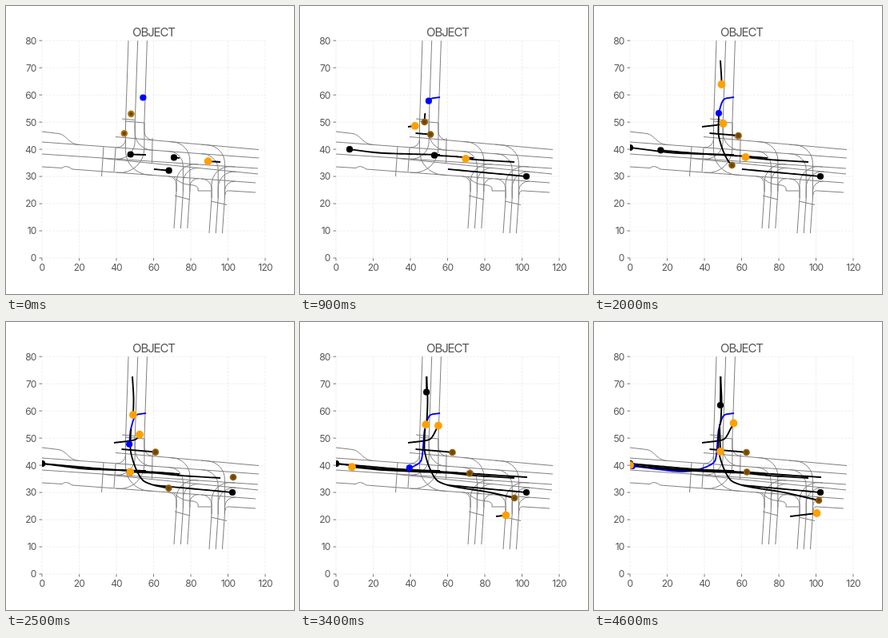
Animation of 360x360 px, one loop 4.7 s. Source, as an HTML page with a canvas:

```html
<!DOCTYPE html>
<html lang="en">
<head>
<meta charset="utf-8">
<title>Object tracks</title>
<style>
html, body { margin: 0; width: 100%; height: 100%; overflow: hidden; background: #fff; }
canvas { display: block; width: 360px; height: 360px; }
</style>
</head>
<body>
<canvas id="stage"></canvas>
<script>
const STEP = 100, STEPS = 47;
const LEFT = 45, RIGHT = 324, TOP = 43.2, BOTTOM = 315;
const FONT = 'Inter, "DejaVu Sans", sans-serif';
const canvas = document.getElementById('stage');
const ctx = canvas.getContext('2d');
const ratio = window.devicePixelRatio || 1;
canvas.width = canvas.height = 360 * ratio;
ctx.scale(ratio, ratio);

// Lane borders across the map, top to bottom: start x, start y, end x, end y
const lanes = [
  [137, 163.5, 316, 179.5],
  [45, 170, 316, 190],
  [45, 185, 315, 203],
  [122, 190.5, 315, 210],
  [83, 204, 312, 221]
];
const laneY = (k, x) => {
  const [x1, y1, x2, y2] = lanes[k];
  return y1 + (x - x1) * (y2 - y1) / (x2 - x1);
};

function buildRoads() {
  // Kerbs that bulge, then crossings and stop lines
  const path = new Path2D(`M45 157L66 159.5C76 161 78 173 92 173.5
    M45 201L70 202.5Q75 198 83 204
    M209 213Q218 223 230 223.5T240 231L256 231M274 236Q274 230 280 231L312 233
    M122 176L119.5 213M137 177L135 207M183 165L182.5 196
    M145 141L161 142.5M149 144L173 146M211 237L230 242M256 244L276 248.5`);
  const line = (x1, y1, x2, y2) => { path.moveTo(x1, y1); path.lineTo(x2, y2); };
  lanes.forEach(lane => line(...lane));

  // Rounded corner from an arm's mouth onto a lane
  const turn = (x, y, k, end, radius) => {
    const corner = laneY(k, x);
    const r = Math.min(radius, Math.abs(end - x), Math.abs(corner - y));
    path.moveTo(x, y);
    path.arcTo(x, corner, end, laneY(k, end), r * 0.95);
    path.lineTo(end, laneY(k, end));
  };

  // Three borders per arm; each turns onto a lane on both sides
  const arm = (outerX, outerY, mouthX, mouthY, gap, reach, radius, leftLanes, rightLanes) => {
    for (let i = 0; i < 3; i++) {
      const x = mouthX + i * gap, center = mouthX + gap;
      line(outerX + i * gap, outerY, x, mouthY);
      turn(x, mouthY, leftLanes[i], center - reach, radius);
      turn(x, mouthY, rightLanes[i], center + reach, radius);
    }
  };
  arm(153, 43, 149.5, 146, 11.7, 23, 32, [1, 2, 4], [4, 1, 0]);
  arm(210, 278, 213, 232, 8.4, 19, 24, [4, 1, 0], [2, 3, 4]);
  arm(254, 284, 257, 240, 8.2, 21, 24, [4, 1, 0], [2, 3, 4]);
  return path;
}
const roads = buildRoads();

// Key points of each agent: step, x, y
const agents = {
  blue: [
    [[-2, 175, 114], [5, 163.5, 116], [20, 156, 134], [30, 151.5, 173], [38, 111.5, 187], [46, 48, 180]]
  ],
  black: [
    [[-2, 175, 186], [5, 106.5, 184], [10.5, 45, 177]],
    [[-2, 185, 204], [8.5, 283, 213]],
    [[-2, 217, 190], [5, 191, 188], [13, 140, 185], [24.5, 45, 177]],
    [[28, 158.5, 68], [38, 158, 97], [46, 158, 104]]
  ],
  brown: [
    [[-2, 144.5, 159], [20, 180.5, 162], [28, 190.5, 163]],
    [[-2, 156.5, 134], [5, 156, 137.5], [13, 155.5, 158], [20, 172.5, 199], [30, 242, 214], [36, 281, 223]],
    [[25, 284, 194], [30, 236, 191], [38, 191, 187.5]]
  ],
  orange: [
    [[-2, 268, 195], [5, 219, 192], [13, 199, 190], [20, 189.5, 189], [30, 104, 185], [36, 45, 179]],
    [[4, 135, 151], [20, 161.5, 147], [30, 171, 133], [38, 174.5, 126.5]],
    [[10, 158, 68], [20, 159.5, 98], [30, 158, 127.5], [38, 157, 129], [46, 158, 162]],
    [[27, 245, 243], [46, 278.5, 239]]
  ]
};
const tracks = Object.entries(agents).flatMap(([kind, list]) => list.map(keys => ({ kind, keys })));

const slope = (keys, i, axis) => (keys[i + 1][axis] - keys[i][axis]) / (keys[i + 1][0] - keys[i][0]);

// Tangent that never overshoots its neighbours
function tangent(keys, i, axis) {
  const last = keys.length - 1;
  if (i === 0 || i === last) return slope(keys, Math.min(i, last - 1), axis);
  const a = slope(keys, i - 1, axis), b = slope(keys, i, axis);
  return a * b <= 0 ? 0 : 2 * a * b / (a + b);
}

function place(keys, step) {
  const last = keys[keys.length - 1];
  if (step >= last[0]) return [last[1], last[2]];
  let i = 0;
  while (keys[i + 1][0] <= step) i++;
  const p = keys[i], q = keys[i + 1], span = q[0] - p[0], u = (step - p[0]) / span;
  return [1, 2].map(axis => {
    const d = q[axis] - p[axis];
    const m = tangent(keys, i, axis) * span, n = tangent(keys, i + 1, axis) * span;
    return p[axis] + u * (m + u * (3 * d - 2 * m - n + u * (m + n - 2 * d)));
  });
}

function line(x1, y1, x2, y2) {
  ctx.beginPath();
  ctx.moveTo(x1, y1);
  ctx.lineTo(x2, y2);
  ctx.stroke();
}

function disc(x, y, r, color) {
  ctx.fillStyle = color;
  ctx.beginPath();
  ctx.arc(x, y, r, 0, Math.PI * 2);
  ctx.fill();
}

function label(text, x, y, size, spacing, align = 'center') {
  ctx.font = `${size}px ${FONT}`;
  ctx.letterSpacing = `${spacing}px`;
  ctx.textAlign = align;
  ctx.fillStyle = '#555';
  ctx.fillText(text, x, y);
}

function gridLine(...ends) {
  ctx.strokeStyle = '#ebebeb';
  ctx.setLineDash([3, 1.4]);
  line(...ends);
  ctx.setLineDash([]);
  ctx.strokeStyle = '#555';
}

function drawAxes() {
  ctx.lineWidth = 0.8;
  for (let v = 0; v <= 120; v += 20) {
    const x = LEFT + v * 2.325;
    gridLine(x, BOTTOM, x, TOP);
    line(x, BOTTOM, x, BOTTOM + 3.5);
    label(v, x, 331.3, 12, -0.8);
  }
  for (let v = 0; v <= 80; v += 10) {
    const y = BOTTOM - v * 3.3975;
    gridLine(LEFT, y, RIGHT, y);
    line(LEFT - 3.5, y, LEFT, y);
    label(v, 37.6, y + 4.4, 12, -0.8, 'right');
  }
  label('OBJECT', 184.5, 37.8, 15, -1.1);
}

function drawTrail({ kind, keys }, step) {
  ctx.strokeStyle = kind === 'blue' ? '#00f' : '#000';
  ctx.beginPath();
  for (let s = keys[0][0]; s <= step; s += 0.5) ctx.lineTo(...place(keys, s));
  ctx.stroke();
}

function drawDot({ kind, keys }, step) {
  const [x, y] = place(keys, step);
  if (kind === 'brown') {
    disc(x, y, 4.3, step < 3 ? '#b3750b' : '#8f5d08');
    disc(x, y, 2.4, '#6e4604');
  } else if (kind === 'orange') {
    disc(x, y, 4.9, '#ffa000');
  } else {
    disc(x, y, 4.1, kind === 'blue' ? '#00f' : '#000');
  }
}

function draw(step) {
  ctx.fillStyle = '#fff';
  ctx.fillRect(0, 0, 360, 360);
  drawAxes();
  ctx.save();
  ctx.beginPath();
  ctx.rect(LEFT, TOP, RIGHT - LEFT, BOTTOM - TOP);
  ctx.clip();
  ctx.lineWidth = 1;
  ctx.strokeStyle = '#808080';
  ctx.stroke(roads);
  ctx.lineWidth = 1.9;
  ctx.lineJoin = 'round';
  const live = tracks.filter(t => t.keys[0][0] <= step);
  live.forEach(t => drawTrail(t, step));
  live.forEach(t => drawDot(t, step));
  ctx.restore();
}

const begin = performance.now();
function tick() {
  const time = Math.max(0, performance.now() - begin);
  draw(Math.floor(time / STEP) % STEPS);
  requestAnimationFrame(tick);
}
tick();
</script>
</body>
</html>
```
